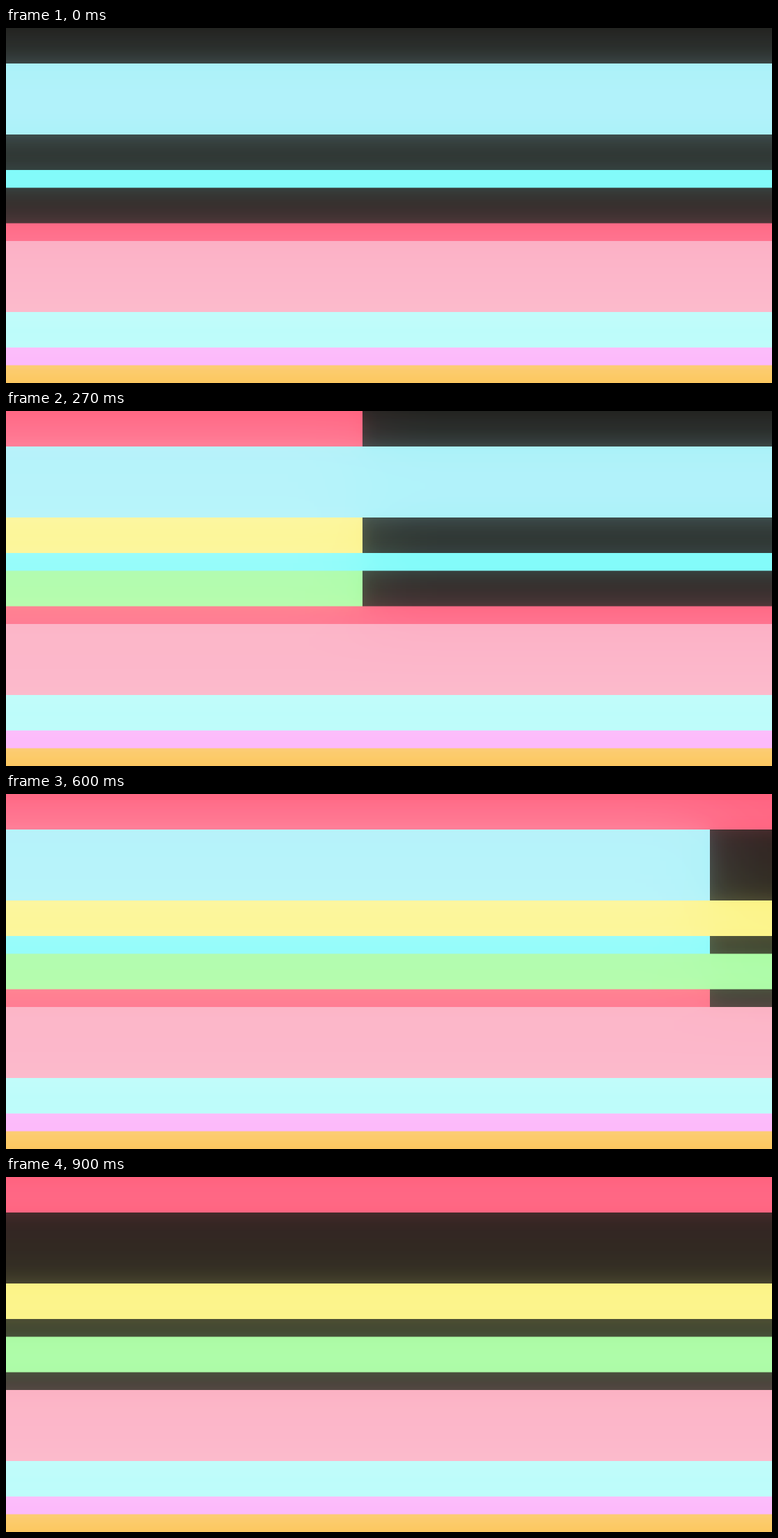
These frames come from a looping animation (1098 by 510 pixels, 1.09 s). An HTML page with a canvas:

```html
<!DOCTYPE html>
<html lang="en">
<head>
<meta charset="utf-8">
<title>Glowing stripes</title>
<style>
  html, body { margin: 0; width: 100%; height: 100%; overflow: hidden; background: #191714; }
  canvas { display: block; }
</style>
</head>
<body>
<canvas id="stage" width="1098" height="510"></canvas>
<script>
const W = 1098, H = 510, UNIT = 25.5, MARGIN = 200;
const LOOP = 1090, STEP = 30;
const DARK = 'rgb(25,23,20)';

// [height in units, colour, role]
const stripes = [
  [2, 'rgb(255,87,115)', 'grow'],
  [4, 'rgb(155,237,247)', 'shrink'],
  [2, 'rgb(251,240,119)', 'grow'],
  [1, 'rgb(112,250,248)', 'shrink'],
  [2, 'rgb(150,250,147)', 'grow'],
  [1, 'rgb(255,83,112)', 'shrink'],
  [4, 'rgb(250,157,180)', 'still'],
  [2, 'rgb(162,250,247)', 'still'],
  [1, 'rgb(250,162,248)', 'still'],
  [1, 'rgb(252,188,74)', 'still']
];

const ctx = document.getElementById('stage').getContext('2d');

// The scene is wider than the stage so the glow does not fade at the sides.
const scene = document.createElement('canvas');
scene.width = W + 2 * MARGIN;
scene.height = H;
const sceneCtx = scene.getContext('2d');

const ease = (t, start, duration) =>
  Math.min(1, Math.max(0, (t - start) / duration)) ** 1.405;

function edgeOf(part) {
  if (part <= 0) return 0;
  if (part >= 1) return scene.width;
  return MARGIN + Math.round(W * part);
}

function drawScene(t) {
  const edges = {
    grow: edgeOf(ease(t, 16, 438)),
    shrink: edgeOf(1 - ease(t, 540, 360)),
    still: scene.width
  };
  let y = 0;
  for (const [units, colour, role] of stripes) {
    const x = edges[role];
    sceneCtx.fillStyle = colour;
    sceneCtx.fillRect(0, y, x, H - y);
    sceneCtx.fillStyle = DARK;
    sceneCtx.fillRect(x, y, scene.width - x, H - y);
    y += units * UNIT;
  }
}

function addGlow(radius, strength) {
  ctx.save();
  ctx.globalCompositeOperation = 'screen';
  ctx.globalAlpha = strength;
  ctx.filter = `blur(${radius}px)`;
  ctx.drawImage(scene, -MARGIN, 0);
  ctx.restore();
}

let lastTime = -1;
function frame() {
  const t = Math.floor(performance.now() % LOOP / STEP) * STEP;
  if (t !== lastTime) {
    lastTime = t;
    drawScene(t);
    ctx.drawImage(scene, -MARGIN, 0);
    addGlow(50, 0.28);
    addGlow(12, 0.16);
  }
  requestAnimationFrame(frame);
}
frame();
</script>
</body>
</html>
```
